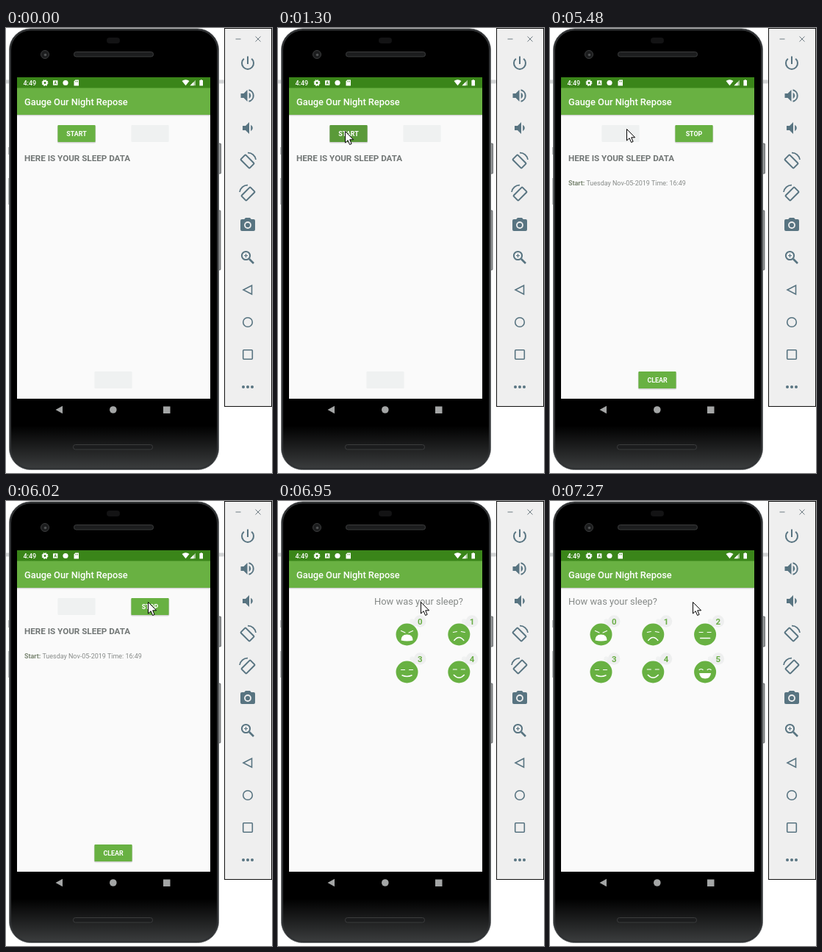
Recreate the animation shown at these times as an HTML page. Size 362 by 605 pixels, loop 8 s.

```html
<!DOCTYPE html>
<html lang="en">
<head>
<meta charset="utf-8">
<title>Sleep tracker</title>
<style>
  html, body { margin: 0; width: 100%; height: 100%; overflow: hidden; background: #fff; }
  svg { display: block; }
  text { font-family: Roboto, "Open Sans", sans-serif; }
  .title { font-size: 12.8px; font-weight: 500; fill: #fff; }
  .label { font-size: 8.9px; font-weight: 700; fill: #fff; text-anchor: middle; }
  .clock { font-size: 9px; font-weight: 500; fill: #fff; }
  .head { font-size: 11.65px; font-weight: 700; fill: #717675; }
  .row { font-size: 8.96px; fill: #878b89; }
  .row tspan { font-weight: 700; fill: #7b8773; }
  .ask { font-size: 12.9px; fill: #858987; }
  .num { font-size: 11.5px; font-weight: 700; fill: #6aae47; text-anchor: middle; }
  .line { fill: none; stroke: #fff; stroke-width: 1.5; stroke-linecap: round; }
  .tools { fill: none; stroke: #587481; stroke-width: 2; }
  .tools .solid { fill: #587481; stroke: none; }
  .face { fill: #68b142; }
  .press .face { fill: #5a9a39; }
  .off .face { fill: #eff1f1; }
  .off .shade, .off .label { display: none; }
</style>
</head>
<body>
<svg width="362" height="605" viewBox="0 0 362 605">
  <defs>
    <linearGradient id="body" x2="0" y2="1">
      <stop offset=".9" stop-color="#000"/>
      <stop offset="1" stop-color="#3c3e3f"/>
    </linearGradient>
    <linearGradient id="drop" x2="0" y2="1">
      <stop offset="0" stop-color="#000" stop-opacity=".22"/>
      <stop offset="1" stop-color="#000" stop-opacity="0"/>
    </linearGradient>
    <clipPath id="view"><rect x="15" y="118" width="263" height="386"/></clipPath>
  </defs>

  <!-- phone -->
  <path d="M0 73H6M288 73H297" stroke="#d2d4d5" stroke-width="5"/>
  <path d="M4 162V172M4 204V240" stroke="#6b6f71"/>
  <g fill="#929596" stroke="#4a4d4f" stroke-width=".7">
    <rect x="288" y="157" width="4.5" height="41" rx="1"/>
    <rect x="288" y="248" width="4" height="81" rx="1"/>
  </g>
  <rect x="4.5" y="1" width="285" height="599.5" rx="29" fill="url(#body)" stroke="#6a6d6f"/>
  <rect x="6" y="2.5" width="282" height="596.5" rx="27.5" fill="none" stroke="#303234" stroke-width="2"/>
  <rect x="137" y="13" width="18" height="8" rx="4" fill="#131314"/>
  <g fill="#1c1d1e" stroke="#3b3c3d">
    <rect x="92.5" y="32.5" width="108" height="6.5" rx="3"/>
    <rect x="91.5" y="566.5" width="108" height="6.5" rx="3"/>
    <circle cx="53" cy="36" r="5.5"/>
  </g>
  <circle cx="53.5" cy="36.5" r="1.8" fill="#505253"/>
  <g fill="#a4a6a6">
    <path d="M67.5 519L77 513.7V524.3Z"/>
    <circle cx="145.8" cy="519" r="4.8"/>
    <rect x="214" y="514.5" width="9.5" height="9.5"/>
  </g>

  <!-- app -->
  <rect x="15" y="67" width="263" height="437" fill="#fafafa"/>
  <g clip-path="url(#view)">
    <g id="tracker">
      <g id="buttons"></g>
      <text class="head" x="25" y="181">HERE IS YOUR SLEEP DATA</text>
      <text id="entry" class="row" x="25" y="213.5"><tspan>Start:</tspan> Tuesday Nov-05-2019 Time: 16:49</text>
    </g>
    <g id="quality">
      <text class="ask" x="25" y="141">How was your sleep?</text>
    </g>
  </g>
  <rect x="15" y="118" width="263" height="2" fill="url(#drop)"/>
  <rect x="15" y="81" width="263" height="37" fill="#69b142"/>
  <rect x="15" y="67" width="263" height="14.5" fill="#3a8519"/>
  <text class="title" x="25" y="105">Gauge Our Night Repose</text>
  <text class="clock" x="23.5" y="77.7">4:49</text>
  <g fill="#fff">
    <circle cx="53" cy="74.5" r="2.5" fill="none" stroke="#fff" stroke-width="2"/>
    <circle cx="53" cy="74.5" r="3.8" fill="none" stroke="#fff" stroke-width="1.2" stroke-dasharray="1.7 1.28"/>
    <rect x="64" y="71.2" width="6.4" height="6.6" rx=".6"/>
    <path d="M65.8 76.5L67.2 72.5L68.6 76.5M66.3 75.2H68.1" fill="none" stroke="#3a8519" stroke-width=".8"/>
    <circle cx="81" cy="74.5" r="3.6"/>
    <path d="M94.3 70.5H99V78.5H92.5V72.5Z"/>
    <path d="M94.7 72V73.5M96.1 72V73.5M97.5 72V73.5" stroke="#3a8519" stroke-width=".7"/>
    <path d="M239.5 72Q244.5 68.5 249.5 72L244.5 78.3Z"/>
    <path d="M250.5 78.3L258 70.8V78.3Z" opacity=".55"/>
    <path d="M250.5 78.3L255.5 73.3V78.3Z"/>
    <path d="M264.8 70.2H266.6V71H268V78.4H263.4V71H264.8Z"/>
  </g>

  <!-- emulator toolbar -->
  <rect x="297.5" y=".5" width="64" height="514" fill="#efefef" stroke="#111"/>
  <path d="M312.5 15H319.5M339.5 11.5L346.5 18.5M346.5 11.5L339.5 18.5" stroke="#6e7c83" fill="none"/>
  <g class="tools">
    <g transform="translate(329 48)"><path d="M0-9.5V1M-5.2-6.2A8 8 0 1 0 5.2-6.2"/></g>
    <g transform="translate(329 92)"><path class="solid" d="M-9.5-3H-5.5L-.5-8V8L-5.5 3H-9.5Z"/><path class="solid" d="M1.7-4.2Q4.3-2.8 4.3 0T1.7 4.2Z"/><path d="M1.5-7.8A8 8 0 0 1 1.5 7.8"/></g>
    <g transform="translate(329 136)"><path class="solid" d="M-7-3H-3L2-8V8L-3 3H-7Z"/><path class="solid" d="M4.2-4.2Q6.8-2.8 6.8 0T4.2 4.2Z"/></g>
    <g id="turn" transform="translate(329 180)"><rect x="-4.7" y="-8.5" width="9.4" height="17" rx="1" transform="translate(-.5 1.5) rotate(-45)"/><path d="M0-10.3A10.8 10.8 0 0 1 11-1" stroke-width="1.7"/></g>
    <use href="#turn" transform="translate(658 44) scale(-1 1)"/>
    <g class="solid" transform="translate(329 268)"><path class="solid" d="M-3-10H3L4.8-8H8Q10-8 10-6V6Q10 8 8 8H-8Q-10 8-10 6V-6Q-10-8-8-8H-4.8Z"/><circle r="4.9" fill="#efefef"/><circle r="3.1"/></g>
    <g transform="translate(329 312)"><circle cx="-2.5" cy="-2.5" r="5.6"/><path d="M2 2L8 8" stroke-width="2.6"/><path d="M-5-2.5H0M-2.5-5V0" stroke-width="1.2"/></g>
    <path d="M323 356L334.5 350V362Z" stroke-width="1.6"/>
    <circle cx="329" cy="400" r="6.3" stroke-width="1.6"/>
    <rect x="322.7" y="437.7" width="12.6" height="12.6" rx="1" stroke-width="1.6"/>
    <g class="solid"><circle cx="323" cy="488" r="2"/><circle cx="329" cy="488" r="2"/><circle cx="335" cy="488" r="2"/></g>
  </g>

  <path id="cursor" d="M.5.5V16L4.1 12.7L6.6 18.5L9.1 17.4L6.7 11.8H11.6Z" fill="#fff" stroke="#000" stroke-linejoin="round"/>
</svg>
<script>
const LOOP = 8000;
const $ = id => document.getElementById(id);

const button = (id, x, y) => `
  <g id="${id}" transform="translate(${x} ${y})">
    <rect class="shade" x="-.2" y=".4" width="52.4" height="24" rx="2" opacity=".16"/>
    <rect class="face" x=".4" width="51.2" height="23" rx="1"/>
    <text class="label" x="26" y="14.6">${id.toUpperCase()}</text>
  </g>`;
$('buttons').innerHTML = button('start', 70, 132) + button('stop', 170, 132) + button('clear', 120, 467);

// Six rating faces, from worst to best
const mouths = [
  '<path d="M-8 8Q-8 0 0 0T8 8Q0 10-8 8Z" fill="#fff"/>',
  '<path class="line" d="M-6.5 8Q0 0 6.5 8"/>',
  '<path class="line" d="M-6.5 5H6.5"/>',
  '<path class="line" d="M-6.5 4.5Q0 7.5 6.5 4.5"/>',
  '<path class="line" d="M-7 4Q0 11.5 7 4"/>',
  '<path d="M-8 1.5H8Q7 9 0 9T-8 1.5Z" fill="#fff"/>'
];
const eyes = [
  'M-8-5L-2.5-2.5M8-5L2.5-2.5', 'M-8-3L-3-4M8-3L3-4', 'M-8-3H-3M8-3H3',
  'M-8-3H-3M8-3H3', 'M-8-3.5H-3M8-3.5H3', 'M-8-3Q-5.5-5-3-3M8-3Q5.5-5 3-3'
];
$('quality').innerHTML += mouths.map((mouth, i) => `
  <g transform="translate(${69.5 + i % 3 * 70.8} ${181.5 + 51 * Math.floor(i / 3)})">
    <circle cx="7" cy="-18" r="3.2" fill="#f1f2f2"/>
    <circle cx="11" cy="-14.5" r="3.6" fill="#eeefef"/>
    <circle cx="17.7" cy="-18" r="8.3" fill="#eeefef"/>
    <circle r="15" fill="#68b142"/>
    <path class="line" d="${eyes[i]}" style="stroke-width:1.2"/>${mouth}
    <text class="num" x="17.7" y="-13.7">${i}</text>
  </g>`).join('');

// Pointer strokes: start, end, then one position per step
const strokes = [
  [80, 840, [173, 551], [164, 522], [149, 478], [131, 423], [113, 364], [98, 308],
    [86, 260], [79, 222], [77, 190], [87, 167], [87, 155]],
  [910, 1070, [88, 149], [90, 143], [91, 140]],
  [5480, 6020, [104, 137], [117, 136], [133, 136], [150, 136], [166, 136], [180, 136], [189, 137], [193, 137]],
  [6250, 6250, [194, 137]]
];

// Index of the held step; slack absorbs the recorder's rounding
const stepAt = (t, from, to, count) =>
  to === from ? 0 : Math.min(count - 1, Math.floor((t - from) / (to - from) * (count - 1) + 0.1));

function pointer(t) {
  const stroke = strokes.filter(s => t >= s[0]).pop();
  if (!stroke) return null;
  const [from, to, ...spots] = stroke;
  return spots[stepAt(t, from, to, spots.length)];
}

function slideOffset(t) {
  if (t < 6720) return 263;
  const held = 6720 + stepAt(t, 6720, 7270, 8) * 550 / 7;
  const p = Math.min(1, (held - 6596) / 640);
  return 263 * (1 + Math.cos(Math.PI * p)) / 2;
}

function setButton(id, on, pressed) {
  $(id).classList.toggle('off', !on);
  $(id).classList.toggle('press', pressed);
}

function draw(t) {
  const tracking = t >= 1380;
  setButton('start', !tracking, t >= 1300);
  setButton('stop', tracking, t >= 6430);
  setButton('clear', tracking, false);
  $('entry').style.display = tracking ? '' : 'none';
  $('tracker').setAttribute('opacity', t < 6500 ? 1 : t < 6580 ? 0.5 : 0);
  $('quality').setAttribute('transform', `translate(${slideOffset(t)} 0)`);

  const spot = pointer(t);
  $('cursor').style.display = spot ? '' : 'none';
  if (spot) $('cursor').setAttribute('transform', `translate(${spot})`);
}

const begin = performance.now();
function tick() {
  draw((performance.now() - begin) % LOOP);
  requestAnimationFrame(tick);
}
tick();
</script>
</body>
</html>
```
